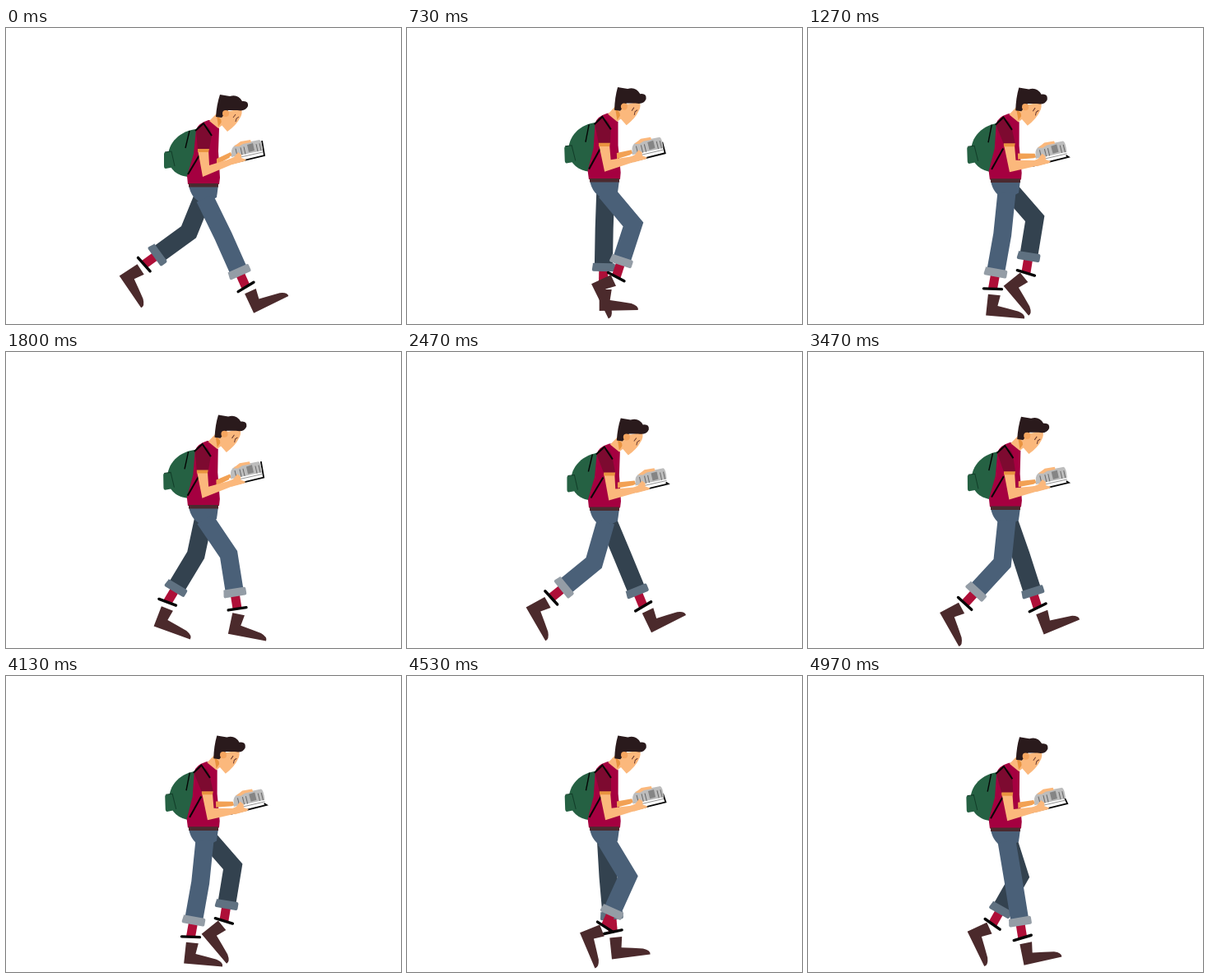
Write an HTML page with a canvas that moves like this. It is 480 by 360 pixels and loops after 5 s.

```html
<!DOCTYPE html>
<html lang="en">
<head>
<meta charset="utf-8">
<title>Reading while walking</title>
<style>
html, body { margin: 0; width: 100%; height: 100%; overflow: hidden; background: #fff; }
canvas { display: block; }
</style>
</head>
<body>
<canvas id="stage" width="480" height="360"></canvas>
<script>
const ctx = document.getElementById('stage').getContext('2d');
const LOOP = 5000, CYCLE = 24, FAR_LIFT = 7, RAD = Math.PI / 180;
const THIGH = 52, SHIN = 47, ANKLE = 21;
const SKIN = '#fbb87c', SHADE = '#e9933f', SHIRT = '#a50040', BOOT = '#4b2a2c', BLACK = '#050505';

// angles from straight down, at eight even moments of one stride
const THIGH_SWING = [-26, -15, 2, 12, 22, -5, -40, -34];
const SHIN_SWING = [-24, -13, 1, 31, 54, 35, 18, -9];
const FOOT_SWING = [-25, -16, 0, 21, 57, 62, 65, 12];

// smooth closed curve through evenly spaced values, phase 0..1
function swing(keys, phase) {
  const n = keys.length, i = Math.floor(phase * n), u = phase * n - i;
  const [a, b, c, d] = [-1, 0, 1, 2].map(k => keys[(i + k + n) % n]);
  return (b + u / 2 * (c - a + u * (2 * a - 5 * b + 4 * c - d + u * (3 * (b - c) + d - a)))) * RAD;
}

function fill(color, path) {
  ctx.fillStyle = color;
  ctx.fill(new Path2D(path));
}

function line(color, width, path, cap = 'butt') {
  ctx.strokeStyle = color;
  ctx.lineWidth = width;
  ctx.lineCap = cap;
  ctx.stroke(new Path2D(path));
}

function at(x, y, angle, draw) {
  ctx.save();
  ctx.translate(x, y);
  ctx.rotate(angle);
  draw();
  ctx.restore();
}

const bone = ([x, y], length, angle) => [x - length * Math.sin(angle), y + length * Math.cos(angle)];

function leg(phase, hip, cloth, cuffColor) {
  const shin = swing(SHIN_SWING, phase), foot = swing(FOOT_SWING, phase);
  const knee = bone(hip, THIGH, swing(THIGH_SWING, phase));
  const cuff = bone(knee, SHIN, shin);
  const band = bone(cuff, 20, shin);
  const boot = bone(cuff, ANKLE, shin - 6 * RAD);
  line('#ae0f38', 11, `M${cuff}L${band}`);
  line(cloth, 22, `M${hip}L${knee}L${cuff}`);
  at(...cuff, shin, () => fill(cuffColor, 'M-13-4Q-14-5-12-5H12Q14-5 14-3V3Q14 5 12 5H-12Q-14 5-14 3Z'));
  at(...band, shin + .35 * (foot - shin) - .12, () => line(BLACK, 3.4, 'M-11 0H11', 'round'));
  at(...boot, foot, () => fill(BOOT, 'M-7 6H8L6 19Q20 21 32 23Q41 26 40 31L-7 32Z'));
}

function backpack() {
  fill('#256143', 'M233 123C212 124 196 140 197 158C198 172 208 180 222 181L235 150Z');
  fill('#256143', 'M194 151L202 150L205 169L194 171Q192 171 192 168V153Q192 151 194 151Z');
  line('#123d29', 1, 'M193 151L201 150L205 168');
  line(BLACK, 1.4, 'M223 125L218 146');
}

function head() {
  fill(SKIN, 'M256 104L265 112L263 118L258 122L247 113Z');
  fill(SHADE, 'M256 106L263 113L258 120Z');
  fill(SKIN, 'M261 108Q264 99 272 101L286 98Q288 104 284 110Q280 118 269 126L262 118Z');
  fill('#2a1a1c', 'M260 81L272 83Q282 80 287 89Q295 88 294 95Q291 102 281 100L270 100L262 109L255 108Q256 93 260 81Z');
  fill('#f5a55f', 'M263 104A4 4 0 1 1 271 104A4 4 0 1 1 263 104Z');
  line('#6a3a30', 1, 'M276 109L279 105M279 114L280 110L283 108');
}

function book(sway) {
  fill('#fff', 'M272 156L312 147L313 154L271 164Z');
  line(BLACK, 1.8, `M270 165.500L314 155L311 ${Math.min(153, 137 + 13 * sway)}`);
  line('#777', .8, 'M276 159L312 151');
  fill('#bdbdbd', 'M274 157V149Q275 143 283 141L308 136Q311 137 312 149Z');
  for (const x of [279, 285, 289, 304, 308]) line('#686868', 1, `M${x} ${208 - x * .22}l2 9`);
  fill('#858585', 'M293 142L300 140L302 149L295 151Z');
  fill(SKIN, 'M277 144L285 138L297 136L298 139L288 141L283 144Z');
}

function upperBody(e, sway) {
  const packShift = 1.6 * sway, sx = 233 + 4 * sway;
  const hx = 2.3 * sway, hy = 3.6 * sway + 1.4 * e;
  at(packShift, 0, 0, backpack);
  fill(SHIRT, 'M246 112Q233 116 231 124L228 153L220 180L221 190H259L260 182L258 150L259 122L249 112Z');
  line(BLACK, 2, `M${221 + packShift} 178L${236 + packShift} 153`);
  head();
  fill('#f2a154', `M256 159L${273 + hx} ${151 + hy}L${275 + hx} ${156 + hy}L256 166Z`);
  at(hx, hy, 0, () => book(sway));
  fill('#7d0a30', `M236 118Q248 117 250 130L${sx + 14} 148H${sx}L231 126Z`);
  line(BLACK, 2, 'M230 125L240 116L250 131');
  fill(SKIN, `M${sx} 148H${sx + 13}L${sx + 14} 167L${273 + hx} ${159 + hy}L${277 + hx} ${165 + hy}L${sx + 6} 181Z`);
  fill(SHADE, `M${sx} 147H${sx + 14}L${sx + 13} 151H${sx}Z`);
  at(hx, hy, 0, () => fill(SKIN, 'M270 160L277 157L282 151L286 154L286 158L292 160L290 162L275 166Z'));
}

function draw(t) {
  // drawn at 25 pictures a second, shown on a 30 Hz clock
  const tick30 = Math.floor(t * .03 + .2);
  const phase = Math.floor(tick30 * 5 / 6) % CYCLE / CYCLE;
  const turn = phase * 2 * Math.PI;
  const e = 1 - Math.cos(2 * turn);
  const sway = Math.cos(turn - Math.PI * 5 / 6) + .87;
  const belt = 191 - 3 * e;
  const hip = [241.5, belt + 16 - e];

  ctx.fillStyle = '#fff';
  ctx.fillRect(0, 0, 480, 360);

  at(0, -FAR_LIFT, 0, () => leg((phase + .5) % 1, hip, '#33424f', '#5f7181'));
  at(0, belt, 0, () => fill('#4a6078', 'M222 0H258L256 15L241 23Q225 18 222 0Z'));
  leg(phase, hip, '#4a6078', '#949da6');

  // the torso stretches and straightens as the body rises
  ctx.save();
  ctx.translate(240, belt);
  ctx.transform(1, 0, .018 * e, 1 + .014 * e, 0, 0);
  ctx.translate(-240, -191);
  upperBody(e, sway);
  fill('#4a2a2f', 'M222 189H258V193.500H222Z');
  ctx.restore();
}

function tick() {
  draw(performance.now() % LOOP);
  requestAnimationFrame(tick);
}
tick();
</script>
</body>
</html>
```
